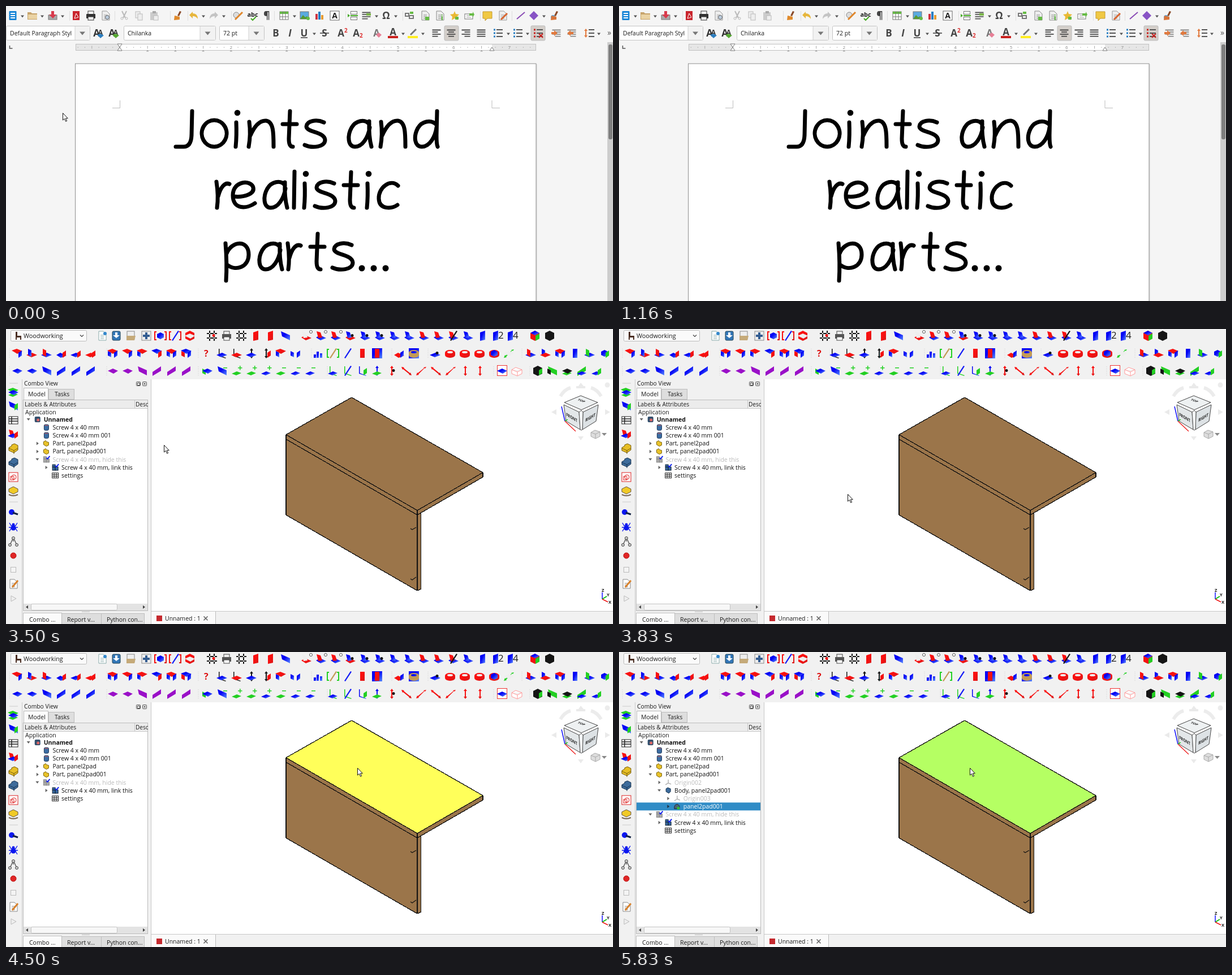
An HTML page for the animation above (8 s loop, 1073 by 522 pixels).

```html
<!DOCTYPE html>
<html lang="en">
<head>
<meta charset="utf-8">
<title>Joints and realistic parts</title>
<style>
html, body { margin: 0; width: 100%; height: 100%; overflow: hidden; background: #f4f4f4 }
svg { display: block; width: 100%; height: 100% }
text { font-family: "Open Sans", "Noto Sans", sans-serif; white-space: pre }
</style>
</head>
<body>
<svg id="stage" viewBox="0 0 1073 522"></svg>
<script>
const rect = (x, y, w, h, fill, stroke = 'none', rx = 0) =>
  `<rect x="${x}" y="${y}" width="${w}" height="${h}" rx="${rx}" fill="${fill}" stroke="${stroke}"/>`;
const path = (d, fill = 'none', stroke = 'none', w = 1, more = '') =>
  `<path d="${d}" fill="${fill}" stroke="${stroke}" stroke-width="${w}" ${more}/>`;
const line = (d, stroke, w = 1) => path(d, 'none', stroke, w);
const disc = (x, y, r, fill, stroke = 'none') => `<circle cx="${x}" cy="${y}" r="${r}" fill="${fill}" stroke="${stroke}"/>`;
const text = (x, y, s, size = 10.5, fill = '#1c1c1c', more = '') =>
  `<text x="${x}" y="${y}" font-size="${size}" fill="${fill}" ${more}>${s}</text>`;
const at = (x, y, body) => `<g transform="translate(${x} ${y})">${body}</g>`;
const group = (id, body) => `<g id="${id}">${body}</g>`;
const down = (x, y, fill = '#555') => path(`M${x - 3} ${y - 1.5}h6l-3 4z`, fill);
const BOLD = 'font-weight="700" ', MID = 'text-anchor="middle" ';

// ---------- word processor ----------
const GLYPHS = {
  J: 'M32-63L31-20Q30 0 17 0L3 0',
  o: 'M22-47A22 23.5 0 1 0 22.1-47Z',
  i: 'M5-43Q6-20 4 0M7-60v.1',
  n: 'M2-44Q5-22 1 0M4-20C12-38 22-47 32-46C45-44 45-24 45 0',
  t: 'M13-63L11-14Q11 0 18 0M0-40H25',
  s: 'M35-43C22-49 5-46 4-36C4-25 36-27 37-12C37 1 14 3 1-3',
  a: 'M38-45Q37-18 42 0M38-40C30-50 14-46 7-34C-1-20 0 0 13 0C26 0 36-16 39-34',
  d: 'M41-63L40-20Q40-4 42 0M40-39C30-49 14-45 7-33C-1-18 1 0 14 0C28 0 38-18 40-34',
  r: 'M1-46Q5-20 2 0M4-20C8-36 16-46 24-42',
  e: 'M2-20C20-18 40-24 37-36C33-50 1-48 1-22C1 4 26 2 40-8',
  l: 'M3-64L2 0',
  c: 'M35-39C22-52 0-36 1-16C2 4 24 2 34-5',
  p: 'M2-46Q5-10 3 20M4-28C12-50 43-54 43-26C43-4 20 4 5-8',
  '.': 'M0-2v.1'
};
const write = (word, y, xs) => [...word].map((c, i) =>
  at(xs[i], y, path(GLYPHS[c], 'none', '#000', c === '.' ? 11 : 7, 'stroke-linecap="round" stroke-linejoin="round"')
    + (c === 'i' ? disc(7, -60, 5.3, '#000') : ''))).join('');

const page = (fill, ink) => path('M-6-8h8l5 5v11H-6z', fill, ink) + line('M-3-1h6M-3 2h6M-3 5h6', ink);
const arrow = c => path('M-8-1l6-6v3q9 0 9 10q-3-5-9-5v4z', c);
const brush = c => path('M3-8l3 1-4 8-3-1z', '#8a4a28') + path('M-6 0l9 2v5l-10 1z', c);
// Text lines: l and r are ragged on one side, c is centred, j is full
const lines = (kind, c = '#444') => line([0, 1, 2, 3].map(i => {
  const inset = kind === 'j' || i % 2 === 0 ? 0 : 5;
  return `M${-7.5 + (kind === 'r' ? inset : kind === 'c' ? inset / 2 : 0)} ${i * 3.7 - 5.5}h${15 - inset}`;
}).join(''), c, 1.8);
const bullets = c => line('M-3-6h11M-3 0h11M-3 6h11', '#555', 1.8) + line('M-8-6h3M-8 0h3M-8 6h3', c, 3);
const field = c => rect(-7, -3, 14, 9, '#fff', '#777') + line('M-4 0h6M-4 3h8', '#999') + path('M1-4h6v-3l3 5-3 5v-3h-6z', c);

const topIcons = [
  [12, rect(-6.5, -8, 13, 16, '#1684d6', 'none', 1) + line('M-4-4h8M-4 0h8M-4 4h8', '#fff', 2)],
  [47, path('M-9-6h6l2 2h9v11H-9z', '#c7a46c') + rect(-8, -2, 16, 8, '#ead3a4')],
  [83, rect(-8, -1, 15, 8, '#aaa', '#777') + path('M-3-8h5v6h4l-6 7-7-7h4z', '#d93a4c')],
  [124, rect(-6, -8, 12, 16, '#c9252d') + path('M-3 5l3-9 4 7z', 'none', '#fff')],
  [150, rect(-5, -8, 10, 6, '#fff', '#333') + rect(-8, -3, 16, 8, '#333', 'none', 1) + rect(-5, 2, 10, 6, '#eee', '#333')],
  [176, page('#eee', '#999') + disc(3, 3, 3.5, '#bcd', '#666')],
  [209, line('M-4-8l6 12M4-8l-6 12', '#bbb', 2) + disc(-4, 5, 2, 'none', '#bbb') + disc(4, 5, 2, 'none', '#bbb')],
  [235, rect(-6, -7, 8, 11, '#eee', '#bbb') + rect(-2, -3, 8, 11, '#eee', '#bbb')],
  [262, rect(-7, -6, 13, 14, '#ccc') + rect(-3, -8, 6, 4, '#aaa') + rect(-1, 0, 8, 8, '#eee', '#bbb')],
  [304, brush('#e08a2c')], [332, arrow('#e7b63c')],
  [367, `<g transform="scale(-1 1)">${arrow('#c4c4c4')}</g>`],
  [410, disc(-3, -1, 5, '#ddd', '#888') + line('M-5 7L8-6', '#e0862b', 3)],
  [436, text(0, 2, 'abc', 11, '#222', BOLD + MID) + line('M-3 5l3 3 6-6', '#4a2', 2)],
  [461, text(0, 6, '¶', 18, '#444', BOLD + MID)],
  [491, rect(-7, -7, 15, 14, '#fff', '#777') + rect(-7, -7, 15, 4, '#6b4') + line('M-7 2h15M-2-7v14M3-7v14', '#777')],
  [528, rect(-8, -7, 15, 13, '#5aaae0', '#777') + path('M-8 6l5-7 4 4 3-2 3 5z', '#593') + disc(6, 5, 3, '#6b4')],
  [554, rect(-7, -3, 4, 10, '#cf3340') + rect(-2, -7, 4, 14, '#277fc4') + rect(3, -1, 4, 8, '#e79b31')],
  [581, rect(-8, -8, 16, 16, '#fff', '#666') + text(0, 5, 'A', 14, '#222', BOLD + MID)],
  [613, path('M-9-3l4 3-4 3z', '#4a2') + rect(-3.5, -7.5, 11, 5, '#fff', '#777') + rect(-3.5, 2.5, 11, 5, '#fff', '#777') + line('M-4 0H9', '#4a2', 2)],
  [637, lines('l', '#555') + rect(0, -4, 8, 4, '#7ab648')],
  [672, text(0, 6, 'Ω', 17, '#444', BOLD + MID)],
  [713, line('M-7 1h6v-5h-6zM0 5h7V0H0z', '#777', 2) + rect(1, -7, 6, 4, '#6b4')],
  [741, page('#eee', '#888') + rect(0, 2, 7, 6, '#6b4')],
  [767, page('#eee', '#888') + text(2, 8, 'i', 12, '#4a2', BOLD)],
  [793, path('M0-8l2 5 6 1-4 4 1 6-5-3-5 3 1-6-4-4 6-1z', '#e9b934') + rect(1, 2, 6, 5, '#6b4')],
  [818, field('#6b4')],
  [851, path('M-8-7H8V5H0l-4 4V5h-4z', '#f0c843', '#c59a2c')],
  [878, page('#eee', '#999') + line('M-3 7L8-4', '#d86530', 3)],
  [910, line('M-7 6L7-6', '#8a4bb5', 2)], [933, path('M0-8l8 8-8 8-8-8z', '#8854c5')],
  [970, disc(-3, 3, 4, '#5aaae0') + brush('#d8753a')]
];
const letter = (s, c = '#444', more = BOLD) => text(0, 6, s, 17, c, MID + more);
const styleIcon = c => at(-3, 0, letter('A', '#333')) + at(4, -1, text(0, 4, 'A', 12, '#333', MID + BOLD)) + path('M-2 3l6-2 6 3-6 5z', c);
const formatIcons = [
  [163, styleIcon('#2c7ec0')], [190, styleIcon('#56a832')],
  [477, letter('B')], [502, letter('I', '#444', BOLD + 'font-style="italic"')],
  [527, letter('U') + line('M-6 8h12', '#444', 1.6)], [563, letter('S') + line('M-8 0h16', '#444', 1.6)],
  [592, letter('A') + text(6, -1, '2', 10, '#d33', BOLD)], [619, letter('A') + text(6, 8, '2', 10, '#d33', BOLD)],
  [655, letter('A', '#777') + path('M-1 3l5-4 5 4-5 5z', '#e77f96')],
  [684, at(0, -2, letter('A')) + rect(-9, 5, 18, 4, '#c9211e')],
  [719, line('M-4 3L6-7', '#777', 3) + rect(-9, 5, 18, 4, '#ffed22')],
  [761, lines('l')], [787, lines('c')], [813, lines('r')], [840, lines('j')],
  [870, bullets('#277fc4')], [905, bullets('#277fc4')], [941, bullets('#c9211e') + line('M1 1l7 7M8 1l-7 7', '#c9211e', 2)],
  [973, lines('r', '#888') + path('M-9-2h5v-3l6 5-6 5v-3h-5z', '#e27a3f')],
  [1000, lines('r', '#888') + path('M3-2h-5v-3l-6 5 6 5v-3h5z', '#e27a3f')],
  [1031, line('M-1-6h10M-1 0h10M-1 6h10', '#555', 1.8) + path('M-6-8l3 4h-2v8h2l-3 4-3-4h2v-8h-2z', '#e27a3f')]
];
const combo = (x, w, split, label) => rect(x + .5, 35.5, w, 25, '#fff', '#c4c4c4', 2) +
  rect(split, 36, x + w - split, 24, '#f2f2f2') + line(`M${split} 36v24`, '#d0d0d0') +
  path(`M${(split + x + w) / 2 - 5} 45.5h10l-5 6z`, '#777') + text(x + 7, 52, label);

function ruler() {
  let out = rect(123.5, 67.5, 813, 11, '#e6e6e6', '#c0c0c0') + rect(201, 68, 658, 10, '#fff');
  for (let i = -6; i < 60; i++) {
    const x = 201 + i * 12.3;
    if (i % 8) out += line(`M${x} ${i % 4 ? 72.5 : 70.5}v${i % 4 ? 1.5 : 5}`, '#aaa');
    else if (i) out += text(x, 75.5, i / 8, 8, '#888', MID);
    if (i > 0 && i % 4 === 0 && i < 53) out += line(`M${x - 2} 80h4M${x} 78v2`, '#999');
  }
  return out + path('M197 67h8l-4 6 4 6h-8l4-6z', '#fff', '#777') + path('M859 73l4 6h-8z', '#fff', '#777');
}
const writer = rect(0, 0, 1073, 522, '#f5f5f5') +
  [112, 192, 290, 321, 398, 474, 600, 701, 838, 894].map(x => line(`M${x}.5 9v17`, '#dedede')).join('') +
  rect(775, 35, 25, 26, '#d4cfca', '#bbb', 2) + rect(928, 35, 25, 26, '#d4cfca', '#bbb', 2) +
  topIcons.map(([x, m]) => at(x, 17, m)).join('') + formatIcons.map(([x, m]) => at(x, 48, m)).join('') +
  [29, 64, 100, 349, 385, 510, 655, 689, 951].map(x => down(x, 18)).join('') +
  [545, 702, 737, 888, 922, 1048].map(x => down(x, 49)).join('') +
  combo(0, 148, 122, 'Default Paragraph Styl') + combo(208, 162, 343, 'Chilanka') + combo(377, 79, 429, '72 pt') +
  group('hover', rect(118, 38, 30, 21, '#dfe9f1') + path('M130 45.5h10l-5 6z', '#555')) +
  text(1063, 52, '»', 14, '#555') + line('M6.5 70v5h5', '#555', 1.5) + ruler() +
  rect(124, 103, 815, 430, '#ddd') + rect(122.5, 102, 814.5, 430, '#fff', '#8f8f8f') +
  line('M188 180.5h13.5V167M873 180.5h-14V167', '#bdbdbd') +
  rect(1063, 64, 10, 458, '#cdcdcd') + rect(1065, 68, 7, 168, '#7e7e7e', 'none', 3) +
  write('Jointsand', 249, [297, 346, 402, 428, 489, 527, 604, 661, 721]) +
  write('realistic', 357, [371, 400, 455, 507, 523, 545, 597, 634, 658]) +
  write('parts...', 466, [386, 446, 497, 538, 576, 629, 650, 671]);

// ---------- CAD program ----------
const COLORS = { B: 'url(#blue)', R: 'url(#red)', P: '#9a10c8', G: '#23d023', K: '#151515', T: '#c29a55', W: '#eee' };
const SHAPES = {
  f: 'M-9 0L0-4 9 0 1 5Z', F: 'M-9 5L0 1 8 4-1 8Z',
  u: 'M-8-8L8-1V8L-6 1Z', v: 'M-8 2L7-8V0L-8 9Z',
  h: 'M-10-5L-1-8 9-4 0 1Z', H: 'M-10 3L0-1 9 3-1 7Z',
  l: 'M-9-4L-3-1V7L-9 4Z', r: 'M2-1L8-5V4L2 8Z', j: 'M-7-8L-1-5V6L-7 3Z',
  w: 'M-9 3L-2-1 9 4-1 8Z', k: 'M-8-8L-1-6 2 3-5 4Z',
  t: 'M-5-6L4-9V7L-5 9Z', z: 'M-4-8H4V8H-4Z',
  n: 'M-1-5h-2l3-4 3 4H1V5h2L0 9-3 5h2z', d: 'M-9-7l5 1-1 1L6 4l1-1 2 5-5-1 1-1-11-9-1 1z',
  x: 'M9-7l-5 1 1 1L-6 4l-1-1-2 5 5-1-1-1L6-5l1 1z', i: 'M5-9L7-8-4 9-6 8Z',
  e: 'M-9-1a9 5 0 1 1 18 0v4a9 5 0 1 1-18 0zm4-1a5 2 0 1 0 10 0a5 2 0 1 0-10 0z',
  p: 'M5-9h1.5v3h3v1.5h-3v3H5v-3H2V-6h3z', m: 'M2-6h7v1.5H2z', q: 'M-11-8h4v2h-2V6h2v2h-4zM11-8H7v2h2V6H7v2h4z',
  g: 'M-9-5h18v2H-9zM-9 3h18v2H-9zM-5-9h2V9h-2zM3-9h2V9H3z', o: 'M3-3a2.5 2.5 0 1 0 .1 0z',
  s: 'M-9-9H9V9H-9z', c: 'M0-9L8-5V5L0 9-8 5V-5Z', C: 'M0-6L6-3V3L0 6-6 3V-3Z', N: 'M0-9L8-5 0-1-8-5Z', D: 'M1 0L8-4V5L1 9Z',
  a: 'M-6-8h1.5V4L7 8 6 9-6 5Z', y: 'M-8 2h4v6h-4zM-3-3h4v11h-4zM3 0h4v8H3z'
};
const strip = (y, x, codes, step = 26) => codes.split(' ').map((code, i) =>
  at(x + i * step, y, code.match(/../g).map(([c, s]) => path(SHAPES[s], COLORS[c], 'none', 1, 'fill-rule="evenodd"')).join(''))).join('');
const poly = (d, fill, id = '') => path(d, fill, '#111', 1.3, `shape-rendering="crispEdges" stroke-linejoin="round" ${id && `id="${id}"`}`);

const toolbars =
  rect(8.5, 2.5, 134, 19, '#fafafa', '#bbb', 2) + path('M17 5h3v7h7v7h-2v-4h-6v4h-2z', '#4b2f24') +
  text(31, 16, 'Woodworking', 10.8) + path('M131 10.5l3 3 3-3', 'none', '#444', 1.2) +
  at(170, 12, page('#fff', '#8aa') + disc(5, -4, 3, '#38c')) +
  at(195, 12, rect(-7, -8, 14, 16, '#3377b8', '#245', 2) + path('M-2-6h4v5h4l-6 5-6-5h4z', '#fff')) +
  at(221, 12, rect(-7, -8, 13, 14, '#eee', '#888') + path('M-8 0H8l-2 8H-8z', '#c5aa79')) +
  at(248, 12, rect(-8, -8, 16, 16, '#eee', '#888') + line('M0-6V6M-6 0H6', '#345d91', 4)) +
  strip(12, 273, 'BCRq RqBi RcWf') + strip(12, 364, 'KgRo') +
  at(390, 12, rect(-5, -8, 10, 6, '#eee', '#444') + rect(-8, -3, 16, 8, '#555') + rect(-5, 2, 10, 6, '#fff', '#444')) +
  strip(12, 416, 'Kg Rt Bt Bu').replace('url(#blue)', 'url(#red)') +
  strip(12, 531, 'RwWk BwRk BwRk RwBkKo BwBkKo BwBkKo BwBk BwBk BwRk BwRk BwRkKi BwBk Bt') +
  [539, 565, 592].map(x => disc(x, 5, 2.5, '#fff', '#555')).join('') +
  strip(12, 866, 'Bt Bt') + text(870, 17, '2', 17) + text(896, 17, '4', 17) + strip(12, 935, 'RcGDBN KcKo') +
  strip(43, 20, 'RhBr RHBj BHRj BwRr BHRr RHRr') + strip(43, 189, 'RhBlBr RhBr RhBl BhRr RhBlBr BhRlBr') +
  text(350, 49, '?', 16, '#d11', BOLD) + strip(43, 382, 'KaBH KaRH KnBH KnRr RhBl BlBr') +
  strip(43, 552, 'By GqTi Bi Rz BsRz') + strip(43, 695, 'RwBr BsTe') + strip(43, 759, 'BHKo Re Re Re ReBC GxWf') +
  strip(43, 928, 'BHRj BjRH RhBlBr Bz BHGj BCGr') +
  strip(74, 20, 'Bf Bf Bu Bv Bv Bv') + strip(74, 189, 'Pf Pf Pu Pv Pv Pv') +
  strip(74, 356, 'GlBf BuGm GFGp GFGp BFGp GFGm BFGm BFGm') +
  strip(74, 578, 'GaBF GaBi BaGr BnGF RnKo Rd Rx Rd Rx Rn Rn') +
  rect(868.5, 64.5, 17, 18, '#fff', '#e33') + strip(74, 877, 'Bf') + path('M894 72l7-4 11 4v7l-8 4-10-4zl10 4 8-4m-8 4v7', '#fff', '#f99') +
  strip(74, 940, 'KcGr GuKl GFKf GvBF BFGr') +
  [[6, 43], [6, 74], [178, 43], [178, 74], [340, 43], [340, 74], [540, 43], [682, 43], [746, 43], [568, 74], [912, 43], [862, 74], [926, 74]]
    .map(([x, y]) => path(`M${x} ${y - 8}v17`, 'none', '#ccc', 1, 'stroke-dasharray="1 2"')).join('');

const block = (fill, ink) => path('M-8-2l5-3V-7l5-2 6 3v8l-7 5-9-4z', fill, ink) + line('M-8-1l9 4 7-4M1 3v6', ink);
const sideIcons = strip(112, 13, 'GhGFBf') + strip(136, 13, 'BuGr') + strip(186, 13, 'RkBHRr') +
  at(13, 161, rect(-8, -6, 16, 13, '#fff', '#222') + line('M-8-2H8M-8 2H8M-3-6V7', '#222', 1.5)) +
  at(13, 212, block('#e7bf26', '#765b08')) + at(13, 237, block('#3e6c9b', '#163350')) +
  at(13, 262, rect(-8, -8, 16, 16, '#fff', '#d22') + disc(1, 0, 4, 'none', '#d22') + rect(-5, -1, 6, 6, 'none', '#d22')) +
  at(13, 287, path('M-8-4l8-4 8 4v5l-8 4-8-4z', '#f0ca26', '#654') + line('M-8 6q8 4 16 0', '#765', 2)) +
  at(13, 325, disc(-3, -1, 5, '#0a16f0') + line('M-1 0L8 3', '#124', 3)) +
  at(13, 350, disc(0, 2, 4.5, '#0a16f0') + disc(0, -4, 2.5, '#0a16f0') + line('M-7-7l3 5 8 0 3-5M-8 1H8M-7 8l3-5h8l3 5', '#0a16f0', 1.3)) +
  at(13, 376, line('M0-7L-6 6M0-7L6 6M0-3V0', '#555', 1.4) + disc(0, -6, 2.5, '#ccc', '#444') + disc(-6, 6, 2.5, '#ccc', '#444') + disc(6, 6, 2.5, '#ccc', '#444')) +
  disc(13, 401, 5, '#e02626', '#b11') + rect(8.5, 421.5, 9, 9, '#f3f3f3', '#bbb') +
  at(13, 451, page('#fff', '#888') + line('M-2 6L8-6', '#d8822d', 3)) + path('M9 472l9 5-9 5z', '#eee', '#bbb') +
  [96, 306].map(y => line(`M6 ${y}h15`, '#ccc')).join('');

const nodeIcons = {
  doc: rect(-5, -5, 10, 10, '#34506d', 'none', 2) + disc(1, 1, 2.5, '#d66'),
  screw: rect(-4, -5, 8, 10, '#3a6da4', '#1b3557', 2) + line('M-3-3.5h6', '#d55'),
  part: path('M-5-3l4-2 1 2 4 1v5l-4 2-5-3z', '#e9c32a', '#7a6310'),
  axes: line('M0-5V1L-5 4M0 1l5 2', '#aaa', 1.3),
  body: path('M-4-3l3-2 5 2v5l-3 3-5-3z', '#3d6c9d', '#17324f'),
  pad: path('M-5 2q0-6 6-6l3 3v5h-9z', '#4a6578', '#223') + disc(2, 3, 2.5, '#3b3'),
  link: rect(-5, -1, 5, 6, '#36679d', '#123') + rect(0, -1, 5, 6, '#36679d', '#123') + rect(-5, -5, 5, 4, '#36679d', '#123') + line('M0-3l2 2 4-5', '#12e', 2),
  dim: rect(-5, -1, 5, 6, '#aaa', '#888') + rect(0, -1, 5, 6, '#aaa', '#888') + rect(-5, -5, 5, 4, '#aaa', '#888') + line('M0-3l2 2 4-5', '#12e', 2),
  sheet: rect(-5.5, -4.5, 11, 9, '#fff', '#222') + line('M-5-1.5H5M-5 1.5H5M-2-4V4M2-4V4', '#222')
};
// Each row: depth, arrow, icon, label
const head = [[1, 'v', 'doc', 'Unnamed'], [2, '', 'screw', 'Screw 4 x 40 mm'], [2, '', 'screw', 'Screw 4 x 40 mm 001'], [2, '>', 'part', 'Part, panel2pad']];
const tail = [[2, 'v', 'dim', 'Screw 4 x 40 mm, hide this'], [3, '>', 'link', 'Screw 4 x 40 mm, link this'], [3, '', 'sheet', 'settings']];
const closed = [...head, [2, '>', 'part', 'Part, panel2pad001'], ...tail];
const opened = [...head, [2, 'v', 'part', 'Part, panel2pad001'], [3, '>', 'axes', 'Origin002'], [3, 'v', 'body', 'Body, panel2pad001'],
  [4, '>', 'axes', 'Origin003'], [4, '>', 'pad', 'panel2pad001'], ...tail];
const tree = rows => rows.map(([depth, mark, icon, label], i) => {
  const x = 51 + 15.7 * depth, y = 160 + 14.17 * i, picked = icon === 'pad';
  const ink = picked ? '#fff' : icon === 'axes' || icon === 'dim' ? '#bbb' : '#111';
  return (picked ? rect(31, y - 7, 219, 14, '#308cc6') : '') +
    (mark ? path(mark === 'v' ? `M${x - 30} ${y - 2}h6l-3 4z` : `M${x - 28.5} ${y - 3}v6l4-3z`, picked ? '#234' : '#666') : '') +
    at(x - 11, y, nodeIcons[icon]) + text(x, y + 3.8, label, 10.5, ink, depth === 1 ? BOLD : '');
}).join('');

const tab = (x, y, w, h, label, on, tx) => rect(x + .5, y + .5, w, h, on ? '#fbfbfb' : '#dedede', '#bdbdbd') + text(tx, y + h / 2 + 4.2, label);
const panel = line('M28.5 89V522', '#ccc') + text(32, 100, 'Combo View', 10.3) +
  at(234, 97, rect(-3.5, -3.5, 7, 7, 'none', '#555', 1) + rect(-1.5, -1.5, 4, 4, 'none', '#555')) +
  at(245, 97, rect(-3.5, -3.5, 7, 7, 'none', '#555', 1) + line('M-2-2l4 4M2-2l-4 4', '#555')) +
  tab(75, 106, 45, 18, 'Tasks', false, 86) + tab(31, 104, 43, 21, 'Model', true, 39) +
  rect(30.5, 125.5, 220, 373, '#fff', '#bbb') + rect(31, 126, 219, 14, '#ececec') + line('M31 140.5h219M227.5 126v14', '#c8c8c8') +
  text(33, 137, 'Labels &amp; Attributes', 10.3) + text(229, 137, 'Desc', 10) + text(34, 150.5, 'Application') +
  rect(31, 486, 219, 12, '#e3e3e3') + rect(44.5, 486.5, 152, 11, '#f7f7f7', '#c3c3c3', 2) +
  path('M39 489v6l-4-3zM242 489v6l4-3z', '#444') + line('M134 500.5h14', '#bbb') +
  tab(98, 503, 70, 22, 'Report v...', false, 108) + tab(168, 503, 76, 22, 'Python con...', false, 178) + tab(30, 502, 68, 23, 'Combo ...', true, 41);

const nav = path('M1008 101h4l4-6 5 6h3v4h-16zM973 142v10l-9-5zM1059 142v10l9-5zM1011 190h10l-5 7z', '#eaeaea') +
  line('M980 119q7-12 18-15M1034 104q11 3 18 15', '#ececec', 6) + disc(1063, 99, 4.5, '#ececec') +
  path('M987 130L1016 118 1046 130 1017 143Z', '#eef1f2', '#444') + path('M986 134L1013 147 1015 178 990 163Z', '#e3e7e9', '#444') +
  path('M1020 147L1047 134 1043 163 1019 178Z', '#dde2e5', '#444') + path('M1013 147l4-3 3 3-1 31-2 1-2-1z', '#f2f4f5', '#555') +
  [['.9 .35 -.6 .5 1017 127', 'TOP'], ['.85 .5 .1 1.2 1000 157', 'FRONT'], ['.85 -.5 -.1 1.2 1033 157', 'RIGHT']]
    .map(([m, s]) => text(0, 2, s, 6.8, '#222', `${MID} ${BOLD} transform="matrix(${m})"`)).join('') +
  line('M982 137l6 26', '#00f', 1.4) + line('M988 163l5-3', '#0c0', 1.4) + line('M988 163l19 18', '#e22', 1.4) +
  path('M1034 183l7-4 9 3v8l-8 4-8-4z', '#ddd', '#aaa') + path('M1034 183l8 3 8-4M1042 186v8', 'none', '#aaa') + path('M1053 184h9l-4.5 5z', '#888') +
  line('M1054 478v-12', '#11f', 1.5) + line('M1054 478l8-5', '#0b0', 1.5) + line('M1054 478l10 5', '#e11', 1.5) +
  text(1053, 465, 'Z', 7.5, '#111', BOLD) + text(1062, 473, 'Y', 7.5, '#111', BOLD) + text(1065, 486, 'X', 7.5, '#111', BOLD);

const WOOD = '#9b754a', YELLOW = '#ffff5a', GREEN = '#b5ff63';
const model = poly('M727 329L733.5 325V460L727 463Z', WOOD) + poly('M495 195L727 329V463L495 329Z', WOOD, 'front') +
  poly('M495 187L727 321V329L495 195Z', WOOD) + poly('M727 321L843 254V262L727 329Z', WOOD) +
  poly('M495 187L611 121 843 254 727 321Z', WOOD, 'board') +
  group('marks', line('M715 353l3 2 7-4M715 442l3 2 7-5', '#111', 1.2)) +
  group('screws', line('M714 354.5l11-5M714 443.5l11-5', '#111', 3) + line('M715 354l9-4M715 443l9-4', '#665', 1));

const cad = rect(0, 0, 1073, 522, '#f1f1f1') + toolbars + sideIcons + panel + group('closed', tree(closed)) + group('opened', tree(opened)) +
  rect(256, 89, 817, 411, '#fff') + line('M256.5 89V522M256 499.5h817', '#c8c8c8') + rect(257, 500, 113, 22, '#fafafa') + line('M370.5 500v22', '#bbb') +
  rect(266, 507, 10, 10, '#c5292e') + text(281, 516, 'Unnamed : 1') + line('M349.5 508.5l7 7M356.5 508.5l-7 7', '#666', 1.6) + model + nav;

const gradient = (id, a, b) => `<linearGradient id="${id}" x2="1" y2="1"><stop offset=".4" stop-color="${a}"/><stop offset="1" stop-color="${b}"/></linearGradient>`;
document.getElementById('stage').innerHTML = `<defs>${gradient('blue', '#0505f5', '#5a8cff')}${gradient('red', '#fa1010', '#d81818')}</defs>` +
  group('writer', writer) + group('cad', cad) +
  group('cursor', path('M.5.5V13L3.4 10.4 5.6 15.3 7.6 14.4 5.4 9.8H9.3Z', '#fff', '#111', 1));

// ---------- timeline ----------
const LOOP = 8000;
// Start time, then cursor position when it is visible
const cursorSteps = [[0, 100, 189], [500, 99, 159], [830, 136, 43], [1160], [3500, 279, 205], [3830, 404, 292],
  [4160, 583, 243], [4500, 621, 205], [5500, 617, 205], [5830, 620, 205]];
const $ = id => document.getElementById(id);
const show = (id, on) => $(id).style.display = on ? '' : 'none';

function draw() {
  const t = performance.now() % LOOP;
  const within = (a, b) => t >= a && t < b;
  const [, x, y] = cursorSteps.findLast(step => t >= step[0]);
  show('cursor', x !== undefined);
  if (x !== undefined) $('cursor').setAttribute('transform', `translate(${x} ${y})`);
  show('writer', t < 2500);
  show('cad', t >= 2500);
  show('hover', within(830, 1160));
  const frontLit = within(4160, 4500);
  $('front').setAttribute('fill', frontLit ? YELLOW : WOOD);
  $('board').setAttribute('fill', t < 4500 ? WOOD : t < 5830 ? YELLOW : GREEN);
  show('marks', !frontLit);
  show('screws', frontLit);
  show('closed', t < 5830);
  show('opened', t >= 5830);
  requestAnimationFrame(draw);
}
draw();
</script>
</body>
</html>
```
